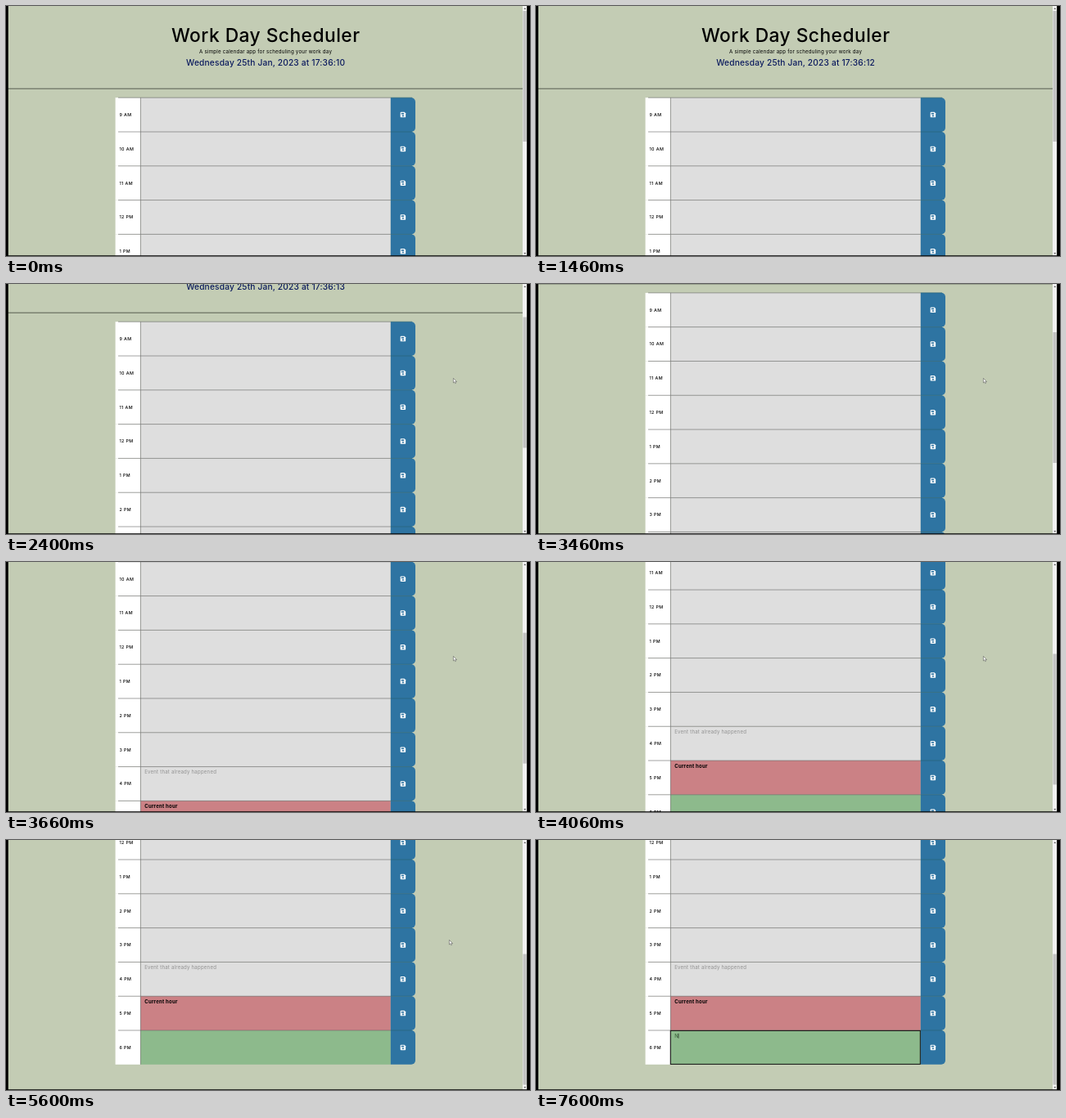
Recreate the animation shown at these times as an HTML page. Size 640x306 px, loop 8 s.

```html
<!DOCTYPE html>
<html lang="en">
<head>
<meta charset="utf-8">
<title>Work Day Scheduler</title>
<style>
  html, body { margin: 0; height: 100%; overflow: hidden; background: #c3ccb4; }
  svg { display: block; font-family: Inter, "Open Sans", sans-serif; }
  .mid { text-anchor: middle; }
  .title { font-size: 22.8px; font-weight: 500; letter-spacing: .45px; }
  .sub { font-size: 6.2px; letter-spacing: .2px; }
  .clock { font-size: 10.2px; font-weight: 500; letter-spacing: .17px; }
  .hour { font-size: 5.3px; font-weight: 500; letter-spacing: .4px; }
  .note { font-size: 6.1px; letter-spacing: .2px; }
</style>
</head>
<body>
<svg width="640" height="306" viewBox="0 0 640 306">
  <defs>
    <g id="save" transform="scale(1.08)">
      <path d="M-3-2.2q0-.8.8-.8H1.6L3-1.6V2.2q0 .8-.8.8H-2.2q-.8 0-.8-.8z" fill="#fff"/>
      <path d="M-2-2H1.2V-.5H-2z" fill="#2e74a2"/>
      <circle cy="1.2" r=".95" fill="#2e74a2"/>
    </g>
  </defs>
  <rect width="640" height="306" fill="#c3ccb4"/>
  <g id="page">
    <text class="mid title" x="317.2" y="44">Work Day Scheduler</text>
    <text class="mid sub" x="317.1" y="57.7">A simple calendar app for scheduling your work day</text>
    <text class="mid clock" id="clock" x="317.1" y="73" fill="#0b1a5e"></text>
    <path d="M2 101.2H631" stroke="#3c4037" stroke-width=".8"/>
    <g id="rows"></g>
    <g id="focus">
      <rect x="164.3" y="488.8" width="305" height="41" fill="none" stroke="#111"/>
      <text class="note" x="169.2" y="497.3" fill="#2f5b31" id="typed">N</text>
      <path id="caret" stroke="#111" stroke-width=".6" d="M0 492.2v6"/>
    </g>
  </g>
  <rect x="631" width="5" height="306" fill="#f1f1f1"/>
  <rect id="thumb" x="631.5" width="4.3" height="160" fill="#c1c1c1"/>
  <path d="M632.4 4h2.8l-1.4-1.8zM632.4 302h2.8l-1.4 1.8z" fill="#555"/>
  <path d="M0 0H2.8V305.2H636.2V0H640V306H0z"/>
  <path id="arrow" d="M0 0V5.6L1.3 4.4 2.2 6.3 3.1 5.9 2.3 4.1H4.1z" fill="#fff" stroke="#444" stroke-width=".5"/>
  <path id="beam" d="M-1-3H1M0-3V3M-1 3H1" fill="none" stroke="#333" stroke-width=".5"/>
</svg>
<script>
const $ = id => document.getElementById(id);
const TOP = 112.2, PITCH = 41.8, LOOP = 8000, FPS = 15;

const hours = ['9 AM', '10 AM', '11 AM', '12 PM', '1 PM', '2 PM', '3 PM', '4 PM', '5 PM', '6 PM'];
const notes = {
  7: ['Event that already happened', '#929292', 400],
  8: ['Current hour', '#000', 700]
};
const fills = { 8: '#cb8185', 9: '#8dba8c' };

$('rows').innerHTML = hours.map((hour, i) => {
  const [text, color, weight] = notes[i] || ['', '#000', 400];
  return `<g transform="translate(0 ${TOP + i * PITCH})">
    <rect x="133.6" width="30.8" height="${PITCH}" fill="#fff"/>
    <rect x="164.4" width="305.4" height="${PITCH}" fill="${fills[i] || '#dedede'}"/>
    <path d="M469.8 0H495a5 5 0 0 1 5 5V36.8a5 5 0 0 1-5 5H469.8z" fill="#2e74a2"/>
    <path d="M137 0H469.8M164.4 0V${PITCH}" stroke="#666" stroke-width=".6"/>
    <path d="M469.8 0H496" stroke="#255f70" stroke-width=".6"/>
    <text class="hour" x="138.5" y="22.8">${hour}</text>
    <text class="note" x="169.2" y="8.8" fill="${color}" font-weight="${weight}">${text}</text>
    <use href="#save" x="484.9" y="20.9" transform="translate(0 0)"/>
  </g>`;
}).join('').replaceAll(' transform="translate(0 0)"', '');

// Keys are [ms, value, ...], linear in between.
const scrollKeys = [[1733, 0], [1933, 22], [2133, 66], [3333, 66], [3667, 154.3],
  [4200, 220], [4400, 220], [4533, 239.4], [4667, 254], [4733, 255.4]];
const mouseKeys = [[5533, 546.4, 115.4], [5600, 541.4, 122.4], [5900, 420, 160],
  [6133, 240, 172], [6333, 238, 255]];

function at(keys, t) {
  const i = keys.findIndex(k => k[0] > t);
  if (i === 0) return keys[0].slice(1);
  if (i < 0) return keys[keys.length - 1].slice(1);
  const a = keys[i - 1], b = keys[i], p = (t - a[0]) / (b[0] - a[0]);
  return a.slice(1).map((v, j) => v + (b[j + 1] - v) * p);
}

const show = (id, on) => $(id).setAttribute('visibility', on ? 'visible' : 'hidden');
const move = (id, x, y) => $(id).setAttribute('transform', `translate(${x} ${y})`);

function draw() {
  const t = Math.floor((performance.now() % LOOP + 7) * FPS / 1000) * 1000 / FPS;
  const [scroll] = at(scrollKeys, t);
  const [x, y] = at(mouseKeys, t);
  const typed = t >= 7595, focused = t >= 6330;
  const mouse = t >= 1660 && !typed;
  const inField = x > 164 && x < 470;

  move('page', 0, -scroll);
  $('thumb').setAttribute('y', 6 + scroll * .523);
  $('clock').textContent = 'Wednesday 25th Jan, 2023 at 17:36:' + (10 + Math.floor((t + 600) / 1000));

  move('arrow', x, y);
  move('beam', x, y);
  show('arrow', mouse && !inField);
  show('beam', mouse && inField);

  show('focus', focused);
  show('typed', typed);
  show('caret', typed || focused && (t < 6860 || t >= 7395));
  move('caret', typed ? 174 : 169.5, 0);
  requestAnimationFrame(draw);
}
draw();
</script>
</body>
</html>
```
